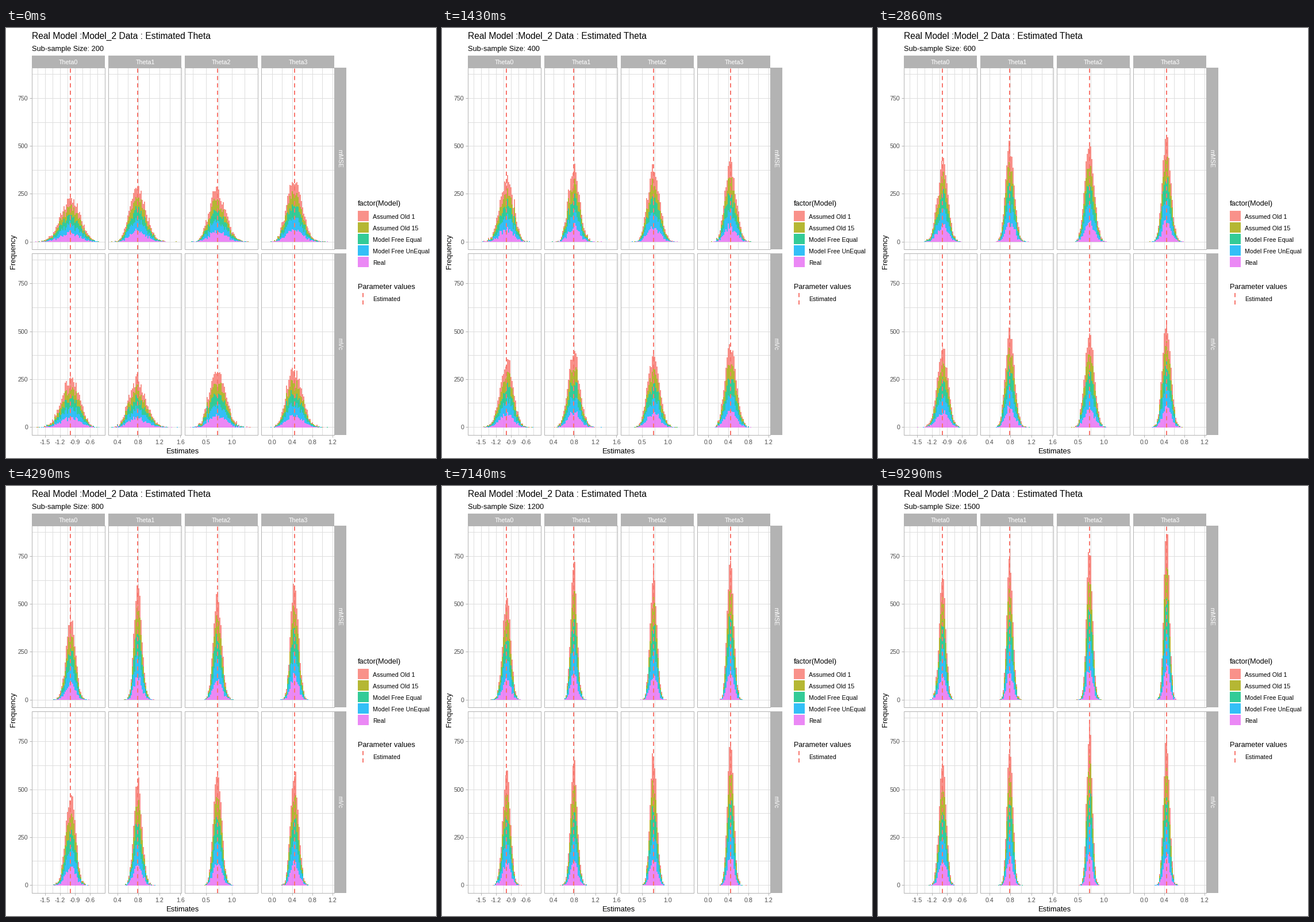
Recreate the animation shown at these times as a matplotlib script. Size 748 by 748 pixels, loop 10 s.

```python
import numpy as np
import matplotlib.pyplot as plt
from matplotlib.animation import FuncAnimation
from matplotlib.patches import Rectangle

SIDE, DPI = 748, 100
PX = 72 / DPI                      # points per pixel
SIZES = range(200, 1501, 100)
STEPS = len(SIZES)
LOOP, TICKS = 10000, 100

LEFTS = [45, 178.5, 311, 444.5]
TOPS = [69, 392]
PANEL_W, PANEL_H = 127, 316
ZERO_Y = [371.5, 694]
UNIT = 83.2 / 250                  # pixels per count
BIN = 1.96                         # pixels per bin

FILLS = {
    "Assumed Old 1": "#F8766D",
    "Assumed Old 15": "#A3A500",
    "Model Free Equal": "#00BF7D",
    "Model Free UnEqual": "#00B0F6",
    "Real": "#E76BF3",
}
GREY, GRID, RED = "#B3B3B3", "#DEDEDE", "#F8766D"

# centre line, x of first label, pixels between labels, labels, skew
COLUMNS = [
    (112.5, 68, 26, ["-1.5", "-1.2", "-0.9", "-0.6"], -0.03),
    (229.5, 194, 36.5, ["0.4", "0.8", "1.2", "1.6"], 0.04),
    (368, 348, 45, ["0.5", "1.0"], 0.03),
    (502, 463, 35, ["0.0", "0.4", "0.8", "1.2"], 0.03),
]

# highest stack in each panel at a few steps
KEY_STEPS = [0, 2, 4, 6, 8, 10, 13]
PEAKS = [
    [[245, 350, 440, 497, 600, 577, 693],
     [293, 410, 530, 603, 643, 722, 775],
     [289, 405, 500, 565, 643, 697, 772],
     [313, 436, 548, 607, 643, 727, 865]],
    [[268, 355, 430, 470, 560, 603, 655],
     [278, 398, 520, 562, 603, 655, 772],
     [290, 398, 490, 585, 648, 690, 855],
     [312, 433, 560, 592, 702, 732, 785]],
]

plt.rcParams["font.family"] = "Liberation Sans"
fig = plt.figure(figsize=(SIDE / DPI, SIDE / DPI), dpi=DPI, facecolor="white")
ax = fig.add_axes([0, 0, 1, 1])
ax.axis("off")


def label(x, y, text, size, color="black", ha="left", va="baseline", angle=0):
    return ax.text(x, y, text, fontsize=size * PX, color=color, ha=ha, va=va,
                   rotation=angle, zorder=6)


def box(x, y, w, h, z=2, **kw):
    ax.add_patch(Rectangle((x, y), w, h, zorder=z, **kw))


def dashed(x, bottom, top):
    ax.plot([x, x], [bottom, top], color=RED, lw=2 * PX, zorder=4,
            linestyle=(0, (3.6, 2.8)), dash_capstyle="butt")


def draw_panel(row, col):
    left, top, zero = LEFTS[col], TOPS[row], ZERO_Y[row]
    right, bottom = left + PANEL_W, top + PANEL_H
    centre, first, step, names, _ = COLUMNS[col]
    ys = zero - 125 * UNIT * np.arange(8)
    xs = first + step / 2 * np.arange(-1, 2 * len(names))
    xs = xs[(xs > left + 2) & (xs < right - 1)]
    ax.hlines(ys, left, right, GRID, lw=PX, zorder=1)
    ax.vlines(xs, top, bottom, GRID, lw=PX, zorder=1)
    dashed(centre, bottom, top)
    box(left, top, PANEL_W, PANEL_H, 5, fill=False, ec=GREY, lw=PX)


def draw_axes():
    for row, (top, zero) in enumerate(zip(TOPS, ZERO_Y)):
        for count in (0, 250, 500, 750):
            y = zero - count * UNIT
            ax.hlines(y, 41, 45, GREY, lw=PX)
            label(38.5, y + 4, str(count), 10.6, "#4D4D4D", "right")
        box(571.5, top, 20.5, PANEL_H, fc=GREY, ec="none")
        label(580.5, top + PANEL_H / 2, ["mMSE", "mVc"][row], 10.6, "white",
              "center", "center", 270)
    for col, (_, first, step, names, _) in enumerate(COLUMNS):
        box(LEFTS[col], 48, PANEL_W, 21, fc=GREY, ec="none")
        label(LEFTS[col] + PANEL_W / 2, 63, f"Theta{col}", 10.6, "white",
              "center")
        for k, name in enumerate(names):
            x = first + k * step
            ax.vlines(x, 708, 712, GREY, lw=PX)
            label(x, 723.5, name, 10.6, "#4D4D4D", "center")
    label(308, 740, "Estimates", 13, ha="center")
    label(13, 389, "Frequency", 12.8, ha="center", va="center", angle=90)


def draw_legend():
    label(612, 309, "factor(Model)", 12.8)
    for i, (name, color) in enumerate(FILLS.items()):
        box(612, 317.5 + 20 * i, 19, 18, fc=color, ec="none", alpha=0.8)
        label(638, 331.5 + 20 * i, name, 10.6)
    label(612, 453.5, "Parameter values", 12.8)
    dashed(621.5, 481, 461)
    label(638, 475, "Estimated", 10.6)


def stacks(row, col, step):
    """Bottom-up cumulative pixel heights of the five models."""
    n = SIZES[step]
    ratios = np.array(PEAKS[row][col]) / np.sqrt([SIZES[s] for s in KEY_STEPS])
    peak = np.interp(step, KEY_STEPS, ratios) * np.sqrt(n)
    # sampling noise lifts the tallest bin above the smooth curve
    sd = 5000 / (np.sqrt(2 * np.pi) * peak) * (1 + 0.8 / np.sqrt(peak)) * BIN
    centre, skew = COLUMNS[col][0], COLUMNS[col][4] * np.sqrt(200 / n)
    rng = np.random.default_rng(1000 * row + 100 * col + step + 7)
    z = rng.standard_normal((len(FILLS), 1000))
    draws = centre + sd * (z + skew * z ** 2)
    counts = np.array([np.histogram(d, EDGES[col])[0] for d in draws])
    total = np.cumsum(counts, axis=0)
    height = total * (peak / total[-1].max() * UNIT)
    return np.maximum(height, total > 0)


EDGES = []
for left, column in zip(LEFTS, COLUMNS):
    start = column[0] - BIN / 2
    below = int((start - left - 3) / BIN)
    EDGES.append(start + BIN * np.arange(-below, 62 - below))

draw_axes()
draw_legend()
label(45, 19, "Real Model :Model_2 Data : Estimated Theta", 15.6)
subtitle = label(45, 40, "", 12.8)

bars = {}
for row in range(2):
    for col in range(4):
        draw_panel(row, col)
        flat = np.full(len(EDGES[col]) - 1, ZERO_Y[row])
        bars[row, col] = [
            ax.stairs(flat, EDGES[col], baseline=flat, fill=True, color=c,
                      alpha=0.8, antialiased=False, zorder=3)
            for c in reversed(list(FILLS.values()))]

ax.set_xlim(0, SIDE)
ax.set_ylim(SIDE, 0)
heights = {(r, c, s): stacks(r, c, s) for r, c in bars for s in range(STEPS)}


def update(tick):
    # a tick shows the step that begins within it
    step = (tick * STEPS + STEPS - 1) // TICKS
    subtitle.set_text(f"Sub-sample Size: {SIZES[step]}")
    for (row, col), layers in bars.items():
        base = np.full(len(EDGES[col]) - 1, ZERO_Y[row] + 0.5)
        floor = base
        for patch, h in zip(layers, heights[row, col, step]):
            patch.set_data(values=base - h, baseline=floor)
            floor = base - h
    return []


anim = FuncAnimation(fig, update, frames=TICKS, interval=LOOP // TICKS,
                     init_func=lambda: update(0), repeat=True, repeat_delay=0,
                     blit=False)
plt.show()
```
